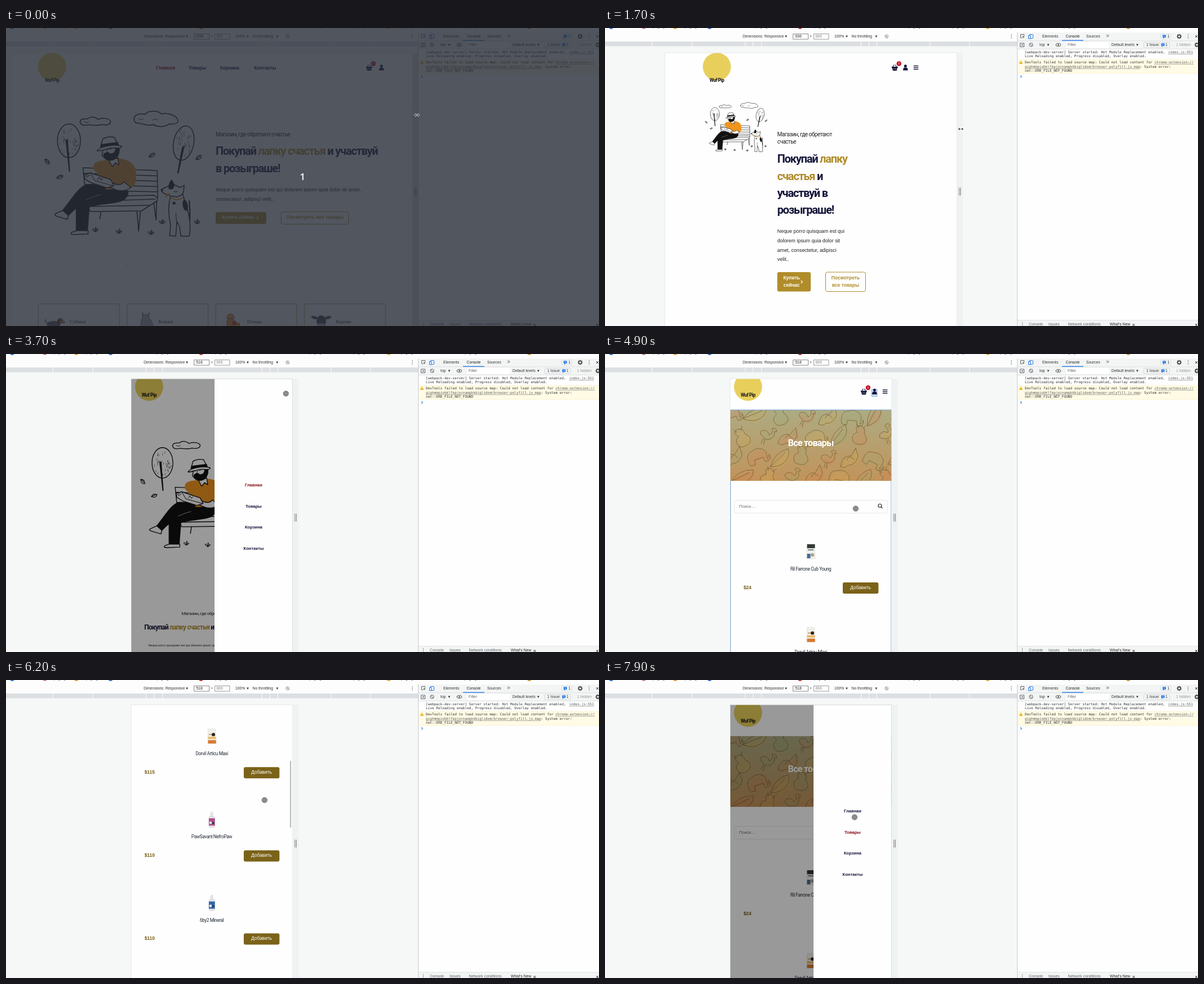
Animation of 1055x531 px, one loop 8 s. Source, as an HTML page with a canvas:

```html
<!DOCTYPE html>
<html lang="ru">
<head>
<meta charset="utf-8">
<title>Responsive preview</title>
<style>
html, body { margin: 0; width: 100%; height: 100%; overflow: hidden; background: #fefefe; }
canvas { display: block; }
</style>
</head>
<body>
<canvas id="c" width="1055" height="531"></canvas>
<script>
const g = document.getElementById('c').getContext('2d');
const SANS = '"Liberation Sans", Arial, sans-serif';
const MONO = '"DejaVu Sans Mono", monospace';
const SERIF = '"Liberation Serif", serif';
const HAND = 'Roboto, sans-serif';
const NAVY = '#15163a', GOLD = '#b08c2a', RED = '#860a12', BLUE = '#1a73e8', GREY = '#5f6368', ORANGE = '#f0961f';
const MID = 366, TOP = 44.5, ZOOM = .5535, LOOP = 8000, STEP = 100;
const NAV = ['Главная', 'Товары', 'Корзина', 'Контакты'];

// Linear interpolation through [time, value] keys.
function at(t, keys) {
  if (t <= keys[0][0]) return keys[0][1];
  for (let i = 1; i < keys.length; i++) {
    const [t0, a] = keys[i - 1], [t1, b] = keys[i];
    if (t <= t1) return a + (b - a) * (t - t0) / (t1 - t0);
  }
  return keys[keys.length - 1][1];
}

function random(seed) {
  return () => (seed = seed * 16807 % 2147483647) / 2147483647;
}

function text(s, x, y, size, color = '#333', o = {}) {
  g.font = `${o.weight || 400} ${size}px ${o.font || SANS}`;
  g.letterSpacing = (o.space || 0) * size + 'px';
  g.textAlign = o.align || 'left';
  g.textBaseline = 'middle';
  g.fillStyle = color;
  g.fillText(s, x, y);
  return g.measureText(s).width;
}
const hand = (s, x, y, size, color, o) => text(s, x, y, size, color, { font: HAND, space: -.05, ...o });
const bold = (s, x, y, size, color, align) => text(s, x, y, size, color, { weight: 700, align });
function headline(parts, x, y, size) {
  for (const [s, color] of parts) x += hand(s, x, y + 1, size, color, { weight: 600, space: -.06 });
}

function rect(x, y, w, h, color) {
  g.fillStyle = color;
  g.fillRect(x, y, w, h);
}
function paint(path, fill, stroke, width) {
  if (fill) { g.fillStyle = fill; g.fill(path); }
  if (stroke) { g.strokeStyle = stroke; g.lineWidth = width || 1; g.stroke(path); }
}
const draw = (d, fill, stroke, width) => paint(new Path2D(d), fill, stroke, width);
function round(x, y, w, h, r, fill, stroke) {
  const p = new Path2D();
  p.roundRect(x, y, w, h, r);
  paint(p, fill, stroke);
}
function oval(x, y, rx, ry, fill, stroke, width, turn = 0) {
  const p = new Path2D();
  p.ellipse(x, y, rx, ry, turn, 0, 7);
  paint(p, fill, stroke, width);
}
const dot = (x, y, r, fill, stroke, width) => oval(x, y, r, r, fill, stroke, width);
const arrow = (x, y) => draw(`M${x - 2} ${y - 1.5}h4l-2 3.5z`, '#333');
function dots(x, y) { for (const d of [-3, 0, 3]) dot(x, y + d, .8, GREY); }
function cross(x, y) { draw(`M${x - 2} ${y - 2}l4 4m0 -4l-4 4`, null, '#333', 1); }

// ---- Illustration: a reader and a dog in the park ----
function crown(x, y, rx, ry, turn, seed) {
  const r = random(seed);
  oval(x, y, rx, ry, '#fefefe', '#111', 1.5, turn);
  for (let i = 0; i < 36; i++) {
    const a = r() * 7, d = Math.sqrt(r()) * .85;
    draw(`M${x + Math.cos(a) * rx * d} ${y + Math.sin(a) * ry * d}l-.5 3`, null, '#333', .7);
  }
}
function leaf(x, y, turn) {
  g.save();
  g.translate(x, y);
  g.rotate(turn);
  draw('M-6 0Q-1 -6 6 -1Q1 6 -6 0L3 -1', '#fefefe', '#111', 1.3);
  g.restore();
}
function scene(x, y, k) {
  g.save();
  g.translate(x, y);
  g.scale(k, k);
  g.lineCap = g.lineJoin = 'round';
  const line = (d, w = 1.5, fill = null) => draw(d, fill, '#111', w);
  const shape = (d, fill = '#fefefe') => line(d, 1.5, fill);

  shape('M132 168C131 163 138 161 145 162C150 157 159 158 164 163C172 159 184 161 186 166C187 172 178 174 170 172C160 176 150 171 143 173C137 174 133 172 132 168Z');
  shape('M228 163C227 153 240 152 247 154C252 147 270 146 276 153C286 151 300 154 305 162C309 170 299 172 290 171C283 177 270 177 262 172C252 176 244 170 237 170C231 170 228 167 228 163Z');
  line('M139 167q4 3 8 0M235 161q5 4 9 1M261 164q5 -3 9 0', .9);
  crown(112, 201, 20.5, 30, 0, 11);
  crown(316, 205, 18, 31, .2, 23);
  line('M107 199L113 255L109 200', 2.2);
  line('M316 212L306 258L314 214', 2.6);
  leaf(73, 238, .9); leaf(96, 266, -.3); leaf(260, 227, -.5); leaf(343, 231, -.6);
  for (const [tx, ty] of [[159, 360], [201, 363], [258, 365], [278, 346], [340, 346]])
    line(`M${tx} ${ty + 3}q-5 -1 -5 -5q4 0 5 5q-1 -6 1 -8q2 4 -1 8q2 -5 5 -4q0 3 -5 4`, 1.1);

  // bench
  shape('M142 300L137 249L269 254L270 302Z');
  for (let i = 1; i < 5; i++) line(`M${137 + i} ${249 + i * 10}L269.5 ${254 + i * 9.5}`);
  shape('M136 301L262 298Q271 300 269 308L241 326L150 327Z');
  line('M142 309L265 305M146 318L255 316');
  line('M233 327L236 362L239 327M263 312L267 342L268 309M169 327L167 340', 1.6);

  // reader
  shape('M101 325L88 331Q84 334 92 336L109 341L111 334Z');
  shape('M126 361L117 364Q112 368 122 368L146 367V361Z');
  shape('M216 290C190 292 165 276 145 279C130 282 118 304 101 325L111 334C122 322 134 314 143 306C130 309 125 312 125 320L125 360L145 360L148 319C165 312 190 314 205 308C215 304 219 296 216 290Z', '#111');
  draw('M143 306Q158 299 168 297', null, '#fefefe', .7);
  draw('M158 241C166 235 176 236 180 235L198 232C214 233 230 240 231 256C233 270 231 280 222 286L178 288C172 276 165 268 163 258C157 256 153 250 158 241Z', ORANGE);
  shape('M222 284Q207 295 190 286L178 281L190 276Q203 283 210 274Z');
  shape('M183 236L189 247L195 240L201 244L199 231Z');
  shape('M139 261L150 258L186 270L192 281L180 285L152 276L140 269Z');
  line('M150 258L158 272L190 281M141 264l5 -4m-3 6l6 -4M163 270l3 -4l3 5l3 -3', 1.1);
  shape('M173 214L171 227Q178 236 190 234Q200 230 200 213Z');
  shape('M174 225C173 234 182 237 190 235C199 232 203 222 201 212L195 213C196 222 190 225 185 224C181 221 177 222 174 225Z', '#111');
  line('M176 217l4 -1M184 216l4 -1M181 217l-2 5l3 0', 1);
  shape('M168 212L172 198Q182 192 193 195L200 209Z');
  draw('M169 207L199 203L201 209L168 213Z', '#111');
  shape('M162 219C166 211 196 206 206 211C205 216 198 213 188 214C178 215 168 220 162 219Z');

  // dog
  line('M324 369Q329 340 326 308', 2.2);
  shape('M293 299C287 318 290 340 293 352L291 370L302 371L304 345L309 354L311 371L326 371C330 352 326 330 318 309L314 294Z');
  shape('M276 288L290 281Q291 275 295 271L299 279Q306 283 311 284L317 280L316 291Q314 299 304 301L296 300Q290 299 287 297Q278 295 276 288Z');
  shape('M294 272L299 281Q297 289 290 286L290 281Z', '#111');
  dot(277.5, 289.5, 2, '#111');
  line('M299 291q3 2 5 0M302 330L304 350', 1.1);
  draw('M294 303Q303 309 314 303', null, ORANGE, 1.9);
  draw('M285 300l5 -4', null, ORANGE, 3);
  dot(299, 312, 2.6, '#111');
  oval(319, 316, 4.5, 10, '#111', null, 0, -.2);
  dot(215.5, 422, .7, '#888');
  g.restore();
}

// ---- Shop page parts ----
function basket(x, y) {
  draw(`M${x - 5.5} ${y - 1.5}h11v2h-1l-1 5h-7l-1 -5h-1z`, NAVY);
  draw(`M${x - 3.5} ${y - 1}l2.5 -4m4.5 4l-2.5 -4`, null, NAVY, 1.2);
  draw(`M${x - 1.5} ${y + 1.5}v2m3 -2v2`, null, '#fff', .8);
  dot(x + 7.5, y - 7, 4.2, '#c20d22');
  text('0', x + 7.5, y - 6.8, 5.5, '#fff', { align: 'center' });
}
function person(x, y) {
  dot(x, y - 2.7, 2.5, NAVY);
  draw(`M${x - 4.3} ${y + 5}q0 -5 3 -5h2.6q3 0 3 5z`, NAVY);
}
function header(L, R, wide, small) {
  const cy = small ? 58.5 : 69, y = small ? 67 : 70.5;
  dot(L + 25, cy, 25, '#e8cf5c');
  hand('Wuf Pip', L + 25, small ? 74 : 94, 8.3, '#15151f', { weight: 600, align: 'center' });
  basket(wide ? R - 29 : R - 42.5, y);
  person(wide ? R - 7 : R - 23.5, y);
  if (!wide) for (const d of [-3, 0, 3]) rect(R - 9, y + d - .7, 8.5, 1.4, NAVY);
}
function chevron(x, y) { draw(`M${x - 1.2} ${y - 2.5}l2.5 2.5l-2.5 2.5`, null, '#fff', 1.2); }

function animal(i, x, y) {
  if (i === 0) {
    oval(x + 15, y + 8, 12, 6, '#555c66'); oval(x + 27, y + 2, 5, 5, '#8a5a3c');
    oval(x + 31, y + 4, 5, 2.5, '#b98a63'); oval(x + 24, y + 4, 2.5, 5, '#5b3a28');
    draw(`M${x + 4} ${y + 6}q-4 -2 -3 -7`, null, '#555c66', 1.6);
  } else if (i === 1) {
    draw(`M${x + 13} ${y + 16}q-2 -14 3 -20l-1 -9l4 4h5l4 -4l-1 9q7 7 7 20z`, '#a9b0b5', '#5f6870', 1);
  } else if (i === 2) {
    draw(`M${x + 9} ${y + 14}q-4 -14 4 -17q8 -1 9 7l9 3l-4 9z`, ORANGE, '#5a3020', .8);
    draw(`M${x + 8} ${y - 2}q0 -8 5 -8q1 -2 4 0q5 2 4 7z`, '#f0a62c', '#5a3020', .8);
    oval(x + 21, y + 6, 4, 4, '#d4332a');
  } else {
    oval(x + 6, y - 4, 6, 2.8, '#4b5159', null, 0, .25);
    oval(x + 30, y - 4, 6, 2.8, '#4b5159', null, 0, -.25);
    oval(x + 18, y + 2, 8.5, 10, '#3f454d');
    oval(x + 18, y + 11, 8, 5, '#aab1b8');
  }
}
function cards(k) {
  const labels = ['Собаки', 'Кошки', 'Птицы', 'Корова'];
  labels.forEach((s, i) => {
    const x = MID + (57.5 - MID + i * 157.8) * k;
    round(x, 491.5, 144.3 * k, 60, 3, null, '#bba75c');
    animal(i, x + 12 * k, 520);
    text(s, x + 56 * k, 523.5, 9, '#222', { font: SERIF });
  });
}

const BUY = 'Покупай ', PAW = 'лапку ', LUCK = 'счастья ';
const SHOP = 'Магазин, где обретают счастье';
const LOREM = ['Neque porro quisquam est qui dolorem ipsum quia dolor sit amet,', 'consectetur, adipisci velit..'];

function homeWide(w) {
  const k = w >= 1200 ? 1 : .838, L = MID - 309 * k, R = MID + 309 * k, x = 373;
  header(L, R, true);
  [267, 325, 381, 441.5].forEach((nx, i) => bold(NAV[i], nx, 72, 8.3, i ? NAVY : RED));
  scene(L - 57 * k, 260 * (1 - k), k);
  hand(SHOP, x, 190, 10, '#222');
  if (k === 1) {
    headline([[BUY, NAVY], [PAW + LUCK, GOLD], ['и участвуй', NAVY]], x, 219.5, 20);
    headline([['в розыграше!', NAVY]], x, 250.5, 20);
  } else {
    headline([[BUY, NAVY], [PAW + LUCK, GOLD], ['и', NAVY]], x, 219.5, 20);
    headline([['участвуй в розыграше!', NAVY]], x, 250.5, 20);
  }
  LOREM.forEach((s, i) => text(s, x, 288.5 + i * 16.6, 8.94, '#222'));
  round(373, 328, 90, 21, 3, GOLD);
  bold('Купить сейчас', 384, 338, 8.2, '#fff');
  chevron(447.5, 338.5);
  round(489.5, 327.5, 120, 22, 3, null, GOLD);
  bold('Посмотреть все товары', 549.5, 338, 8.5, GOLD, 'center');
  cards(k);
}
function homeMiddle() {
  const x = 306.5;
  header(174, 558);
  scene(151.2, 74, .395);
  hand('Магазин, где обретают', x, 190, 10, '#222');
  hand('счастье', x, 203.5, 10, '#222');
  headline([[BUY, NAVY], [PAW, GOLD]], x, 233, 20);
  headline([[LUCK, GOLD], ['и', NAVY]], x, 264, 20);
  headline([['участвуй в', NAVY]], x, 294, 20);
  headline([['розыграше!', NAVY]], x, 324.5, 20);
  ['Neque porro quisquam est qui', 'dolorem ipsum quia dolor sit', 'amet, consectetur, adipisci', 'velit..']
    .forEach((s, i) => text(s, x, 363 + i * 16.6, 8.94, '#222'));
  round(306.5, 435, 59.5, 34.5, 3, GOLD);
  bold('Купить', 332, 446, 8.5, '#fff', 'center');
  bold('сейчас', 332, 458.5, 8.5, '#fff', 'center');
  chevron(350, 452.5);
  round(392.5, 435, 71, 34.5, 3, null, GOLD);
  bold('Посмотреть', 428, 446, 8.5, GOLD, 'center');
  bold('все товары', 428, 458.5, 8.5, GOLD, 'center');
}
function homeSmall(w) {
  const half = Math.min(w * ZOOM / 2 - 7, 143);
  header(MID - half, MID + half, false, true);
  scene(177, 12, .905);
  hand(SHOP, MID, 462.5, 8.1, '#222', { align: 'center' });
  headline([[BUY, NAVY], [PAW + LUCK, GOLD], ['и участвуй в розыграше!', NAVY]], 246, 486.5, 11.9);
  text(LOREM.join(' '), MID, 519.5, 5.53, '#222', { align: 'center' });
}
function home(w) {
  if (w >= 992) homeWide(w);
  else if (w >= 768) homeMiddle();
  else homeSmall(w);
}

const CRITTERS = [
  'M-13 10Q-17 -8 -4 -9Q4 -13 11 -7Q16 -4 13 8Q18 6 17 2Q20 9 13 11L9 11L8 4L-5 4L-6 11Z',
  'M-14 11Q-8 -9 12 -14Q16 -2 4 7Q-4 12 -14 11L8 -9',
  'M-7 12Q-14 2 -4 -3Q-10 -12 -1 -13Q8 -12 6 -3Q15 6 7 12Q0 15 -7 12M-3 -9l-3 -6M3 -9l4 -6',
  'M-1 14V5Q-12 3 -8 -3Q-2 -8 4 -2Q8 -8 3 -12Q8 -17 11 -11L8 -10Q13 -3 7 3Q4 6 1 5L3 14',
  'M-17 3Q-8 -11 3 -4L14 -11L12 1Q3 11 -7 6Q-12 9 -17 3M-5 -1Q1 -8 5 3'
].map(d => new Path2D(d));

function banner(y) {
  g.save();
  g.beginPath();
  g.rect(222, y, 290, 126);
  g.clip();
  const shade = g.createLinearGradient(0, y, 0, y + 126);
  shade.addColorStop(0, '#adab83');
  shade.addColorStop(1, '#c2935a');
  rect(222, y, 290, 126, shade);
  const r = random(77), tints = ['#d77a4a', '#d8b04a', '#8fa873'];
  for (let row = 0; row < 4; row++) for (let col = 0; col < 8; col++) {
    const p = CRITTERS[(col + row * 2) % 5];
    g.save();
    g.translate(222 + col * 42 + row % 2 * 20 + r() * 8, y + 8 + row * 36 + r() * 8);
    g.rotate(r() - .5);
    g.scale(1.25, 1.25);
    g.globalAlpha = .2;
    g.translate(2, 2);
    paint(p, tints[(col + row) % 3]);
    g.translate(-2, -2);
    g.globalAlpha = .85;
    paint(p, null, '#6f5628', .6);
    g.restore();
  }
  g.restore();
  hand('Все товары', MID, y + 59.5, 16.2, '#fff', { weight: 600, align: 'center' });
}

const GOODS = [
  ['Ril Farrone Cub Young', '$24', '#3f6f96'], ['Dorvil Articu Maxi', '$115', '#d9782f'],
  ['PawSavant NefroPaw', '$110', '#b04a86'], ['6by2 Mineral', '$110', '#2f68ae'],
  ['Tolmi Verda Plus', '$95', '#5b8a4a']
];
function pack(i, y, color) {
  if (i < 2) {
    draw(`M359.5 ${y - 13}h13l1.5 26h-15z`, '#f0efe9', '#d8d8d4', .6);
    rect(359.5, y + (i ? 7 : -13), 14, i ? 6 : 7, i ? color : '#343a35');
    rect(359.5, y + (i ? 1 : 4), i ? 14 : 6, i ? 4 : 8, i ? '#edb868' : color);
    rect(361, y - 4, 10, 2, i ? '#c9a06a' : '#77808a');
    dot(369, y + (i ? -3 : 6), 3, i ? '#292522' : '#a99f8c');
  } else {
    draw(`M364.5 ${y - 13}h3l1 8h-5z`, '#e6e7ea', '#c9ccd2', .6);
    round(361, y - 5, 10.5, 19, 2, '#e9eaee', '#cfd2d8');
    rect(361, y - 2, 10.5, 13, color);
    dot(364, y + 6, 2.4, '#e5e5ec');
    rect(366.5, y + 5, 4, 3, '#2b3350');
  }
}
function shop(scroll, focus) {
  g.save();
  g.translate(0, -scroll);
  if (focus) {
    round(474.5, 63, 9.5, 12.5, 0, '#cfe0f2', '#86aed6');
    round(223.5, 100, 285.5, 900, 0, null, '#86b0d8');
  }
  header(229.5, 503, false, true);
  banner(100);
  if (focus) rect(223, 99, 287, 1.2, '#86b0d8');
  round(230, 260.5, 272.5, 23, 4, '#fefefe', '#e6e6e6');
  text('Поиск....', 238.5, 272, 7.6, '#6d6d6d');
  dot(489, 270.3, 3, null, '#222', 1.1);
  draw('M491.2 272.5l2.3 2.4', null, '#222', 1.2);
  GOODS.forEach(([name, price, color], i) => {
    const y = i * 148.2;
    pack(i, 352 + y, color);
    hand(name, MID, 383.5 + y, 8.3, '#222a35', { align: 'center' });
    bold(price, 246.5, 416.5 + y, 8.3, '#755a14');
    round(423, 407 + y, 63.5, 20, 3, '#7b6219');
    text('Добавить', 454.7, 416.5 + y, 8.3, '#fff', { align: 'center' });
  });
  g.restore();
}

function menu(p, active) {
  rect(222, 44, 288, 487, `rgba(0,0,0,${.4 * p})`);
  const x = 509.5 - 138.5 * p;
  rect(x, 44, 139, 487, '#fefefe');
  NAV.forEach((s, i) => bold(s, x + 69.5, 234 + i * 37.7, 7.6, i === active ? RED : NAVY, 'center'));
}

// ---- Browser frame ----
function badge(x, y) {
  round(x - 3, y - 2.7, 6, 4.8, 1, BLUE);
  draw(`M${x - 2} ${y + 1}v3l3 -3z`, BLUE);
  draw(`M${x - 1.7} ${y - 1.2}h3.4m-3.4 1.7h3.4`, null, '#fff', .5);
}
function gear(x, y) {
  dot(x, y, 2.6, null, '#444', 1.6);
  for (let i = 0; i < 8; i++) dot(x + Math.cos(i * .785) * 3.7, y + Math.sin(i * .785) * 3.7, .8, '#444');
}
function link(s, x, y) {
  const w = text(s, x, y, 6.08, '#555', { font: MONO });
  rect(x, y + 3, w, .6, '#777');
}
function toolbar(w) {
  rect(0, 0, 1055, 531, '#f6f8f8');
  rect(0, 0, 1055, 24, '#fdfdfd');
  [[11, BLUE], [69, '#d58a8a'], [125, '#f2992e'], [186, '#2e6fd0'], [347, '#c8372d'], [681, '#eab030'], [931, '#c79b35']]
    .forEach(([x, c]) => dot(x, -2, 4, c));
  [85, 142, 268, 372, 540, 618, 703, 816].forEach(x => text('page guide', x, -3, 7, '#444'));
  text('Dimensions: Responsive', 245, 15, 6.65);
  arrow(322, 15);
  round(334.5, 10.5, 27, 9.5, 0, '#fff', '#888');
  text(Math.round(w), 344, 15.3, 6.8, '#222', { align: 'center' });
  text('×', 366, 15, 7, GREY, { align: 'center' });
  round(371.5, 10.5, 26.5, 9.5, 0, '#fff', '#999');
  text('888', 380, 15.3, 6.8, '#888', { align: 'center' });
  text('100%', 408, 15, 6.8);
  arrow(430, 15);
  text('No throttling', 438.5, 15, 6.8);
  arrow(482.5, 15);
  dot(501, 15, 3, null, '#888', .8);
  draw('M499.5 13.5l3 3', null, '#888', 1.2);
  dots(723, 15);
  rect(0, 24, 733, 8.5, '#dcdfe2');
  for (const x of [83, 154, 249, 263, 278, 455, 469, 483, 578, 648]) rect(x, 24, 1, 8.5, '#fafafa');
}
function devtools() {
  rect(733, 8, 322, 523, '#fefefe');
  rect(733, 8, 322, 29.5, '#f3f5f5');
  rect(733, 22.5, 322, .7, '#d3d6d9');
  rect(733, 37.3, 322, .7, '#d3d6d9');
  rect(733, 8, 1, 523, '#c8cbce');
  draw('M745.5 14v-2.5h-6v6h3', null, GREY, 1);
  draw('M742.5 14l4.5 1.7l-2 .8l-.8 2z', GREY);
  round(755, 11.5, 6.5, 7, 1, null, BLUE);
  round(753.5, 13.5, 3.5, 5.5, 0, '#f3f5f5', BLUE);
  text('Elements', 778, 15, 6.8);
  text('Console', 819.5, 15, 6.8, '#222');
  rect(813, 21.5, 38, 1.3, BLUE);
  text('Sources', 856, 15, 6.8);
  text('»', 891.5, 14.5, 10, GREY);
  round(988.5, 10.5, 18, 9, 1, null, '#dadce0');
  badge(995, 15);
  text('1', 1000.5, 15.3, 6.8);
  gear(1021.5, 15);
  dots(1037.5, 15);
  cross(1052, 15);
  round(738.5, 27, 7, 6.5, 0, null, GREY);
  draw('M741.3 28.5l3 1.8l-3 1.8z', GREY);
  dot(758, 30, 3.2, null, GREY, 1);
  draw('M755.8 27.8l4.4 4.4', null, GREY, 1);
  text('top', 773, 30, 6.8);
  arrow(788.5, 30);
  oval(806.5, 30, 4.2, 2.6, null, '#444', 1);
  dot(806.5, 30, 1.3, '#444');
  rect(820, 25, 76.5, 10.5, '#fff');
  text('Filter', 823, 30.3, 6.8, '#666');
  text('Default levels', 901, 30, 6.8);
  arrow(947, 30);
  round(958.5, 25.5, 46, 9.5, 1, null, '#d5d8db');
  text('1 Issue:', 963, 30.3, 6.8);
  badge(992.5, 30);
  text('1', 997, 30.3, 6.8);
  text('1 hidden', 1016, 30.3, 6.8, '#999');
  gear(1053, 30);

  const log = (s, x, y) => text(s, x, y, 6.08, '#303030', { font: MONO });
  log('[webpack-dev-server] Server started: Hot Module Replacement enabled,', 747, 43.5);
  log('Live Reloading enabled, Progress disabled, Overlay enabled.', 747, 50.5);
  link('index.js:551', 1002, 43.5);
  rect(734, 56, 321, 25, '#fffbe5');
  rect(734, 55.7, 321, .6, '#f6ecbc');
  rect(734, 80.7, 321, .6, '#f6ecbc');
  draw('M740 57.8l3.3 6h-6.6z', '#e8ab13');
  rect(739.7, 59.7, .7, 2.2, '#fff');
  log('DevTools failed to load source map: Could not load content for', 747, 61.3);
  link('chrome-extension://', 977.6, 61.3);
  link('gighmmpiobklfepjocnamgkkbiglidom/browser-polyfill.js.map', 747, 69);
  log(': System error:', 952, 69);
  log('net::ERR_FILE_NOT_FOUND', 747, 76);
  draw('M739 84.2l2.2 2.2l-2.2 2.2', null, '#367cf1', 1.1);

  rect(734, 520.5, 321, 11, '#f3f5f5');
  rect(734, 520.5, 321, .7, '#d3d6d9');
  dots(742.5, 528);
  text('Console', 754, 528.5, 6.8, GREY);
  text('Issues', 789, 528.5, 6.8, GREY);
  text('Network conditions', 823.5, 528.5, 6.9, GREY);
  text("What's New", 898, 528.5, 6.9, '#222');
  cross(940.5, 529);
  cross(1052, 529);
}

function resizer(x, y, light) {
  const d = `M${x - 5} ${y}l3 -2.6v1.8h4v-1.8l3 2.6l-3 2.6v-1.8h-4v1.8z`;
  draw(d, light ? '#222' : '#111', light ? '#eee' : '#fff', .8);
}
function touch(t) {
  const x = at(t, [[2700, 512], [2800, 509], [3100, 498], [3900, 498], [4000, 470], [4100, 446], [4200, 446], [4300, 441.5],
    [4400, 444], [4500, 446], [5100, 446], [5400, 460], [6900, 460], [7000, 475], [7100, 500], [7200, 501.5], [7600, 501.5], [7900, 444]]);
  const y = at(t, [[2700, 180], [3100, 70.5], [3900, 70.5], [4000, 180], [4100, 280.5], [4200, 280.5], [4300, 270],
    [4400, 268.5], [4500, 275.5], [5100, 275.5], [5400, 214], [6900, 214], [7000, 140], [7100, 53], [7200, 71.5], [7600, 71.5], [7900, 244.5]]);
  dot(x, y, 4.8, 'rgba(120,120,120,.85)', 'rgba(90,90,90,.7)', .8);
}

function render(t) {
  const w = at(t, [[800, 1286], [900, 1280], [1100, 1248], [1700, 936], [2600, 518]]);
  const left = Math.round(MID - w * ZOOM / 2), right = Math.round(MID + w * ZOOM / 2) + .5;
  const scroll = at(t, [[5100, 0], [5900, 520], [6000, 530], [6200, 400], [6600, 0]]);
  toolbar(w);

  rect(left - 1, TOP - 1, right - left + 2, 500, '#e6e9e9');
  rect(left, TOP, right - left, 500, '#fefefe');
  g.save();
  g.beginPath();
  g.rect(left, TOP, right - left, 500);
  g.clip();
  if (t < 4900) home(w);
  else shop(scroll, t < 5000);
  if (t > 3200 && t < 4900) menu(at(t, [[3200, 0], [3300, .45], [3400, .85], [3500, 1]]), 0);
  if (t >= 7400) menu(1, 1);
  if (t >= 5200 && t < 6800) round(505.3, 47.5 + scroll * .242, 2, 119, 1, '#b5b5b5');
  g.restore();

  rect(right + 1, TOP, 10.5, 487, t < 1700 ? '#dde1e4' : '#eff2f2');
  rect(right + 4, 284.5, 1, 14, '#777');
  rect(right + 6.5, 284.5, 1, 14, '#777');
  devtools();

  if (t < 100) {
    rect(0, 0, 1055, 531, 'rgba(39,44,55,.8)');
    text('1', 527.5, 266.5, 17, '#fff', { font: '"Open Sans", sans-serif', weight: 600, align: 'center' });
    resizer(731, 155, true);
  } else if (t < 2800) {
    resizer(right + 7.5, at(t, [[600, 162], [1100, 166.5], [1700, 180], [2600, 189]]), t < 600);
  } else touch(t);
}

function tick() {
  render(Math.floor(performance.now() % LOOP / STEP) * STEP);
  requestAnimationFrame(tick);
}
tick();
</script>
</body>
</html>
```
